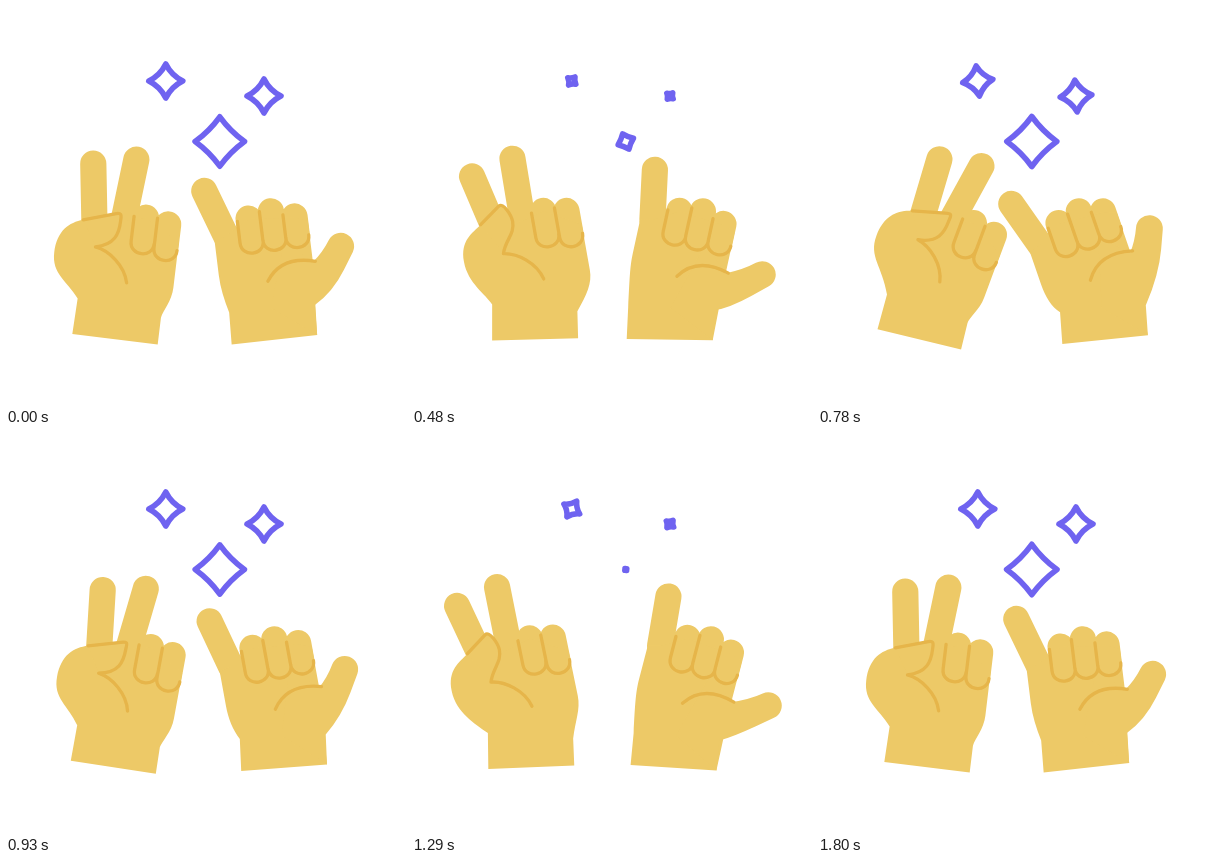
These frames come from a looping animation (400x400 px, 3.83 s). An HTML page:

```html
<!DOCTYPE html>
<html lang="en">
<head>
<meta charset="utf-8">
<title>Hand signs</title>
<style>
  html, body { margin: 0; width: 100%; height: 100%; overflow: hidden; background: #fff; }
  svg { display: block; width: 100%; height: 100%; }
  .skin { fill: #edc967; }
  .digit { fill: none; stroke: #edc967; stroke-width: 26.2; stroke-linecap: round; }
  .crease { fill: none; stroke: #e6b54a; stroke-width: 3.3; stroke-linecap: round; stroke-linejoin: round; }
  .star { fill: none; stroke: #6f63f0; stroke-width: 5.6; stroke-linejoin: round; }
</style>
</head>
<body>
<svg id="stage" viewBox="0 0 400 400"></svg>
<script>
const LOOP = 3830, STEP = 30, END = 1800;
const stage = document.getElementById('stage');

function add(cls) {
  const el = document.createElementNS('http://www.w3.org/2000/svg', 'path');
  el.setAttribute('class', cls);
  stage.appendChild(el);
  return el;
}

const clamp = v => Math.min(1, Math.max(0, v));
const rad = d => d * Math.PI / 180;
const mix = (a, b, k) => a + (b - a) * k;

// Smooth monotone curve through a few keys, at rest at both ends.
function track(times, vals) {
  const n = times.length;
  const slope = i => (vals[i + 1] - vals[i]) / (times[i + 1] - times[i]);
  const tan = vals.map((_, i) => {
    if (i === 0 || i === n - 1) return 0;
    const a = slope(i - 1), b = slope(i);
    return a * b > 0 ? 2 * a * b / (a + b) : 0;
  });
  return t => {
    let i = 0;
    while (i < n - 2 && t > times[i + 1]) i++;
    const h = times[i + 1] - times[i];
    const u = clamp((t - times[i]) / h), v = 1 - u;
    return v * v * ((1 + 2 * u) * vals[i] + u * h * tan[i]) +
           u * u * ((3 - 2 * u) * vals[i + 1] - v * h * tan[i + 1]);
  };
}

// The hands mirror one swing; each also slides a little sideways.
const beats = [0, 510, 780, 1050, 1290, 1500, END];
const swing = track(beats, [7, -12.5, 19, 0, -14.5, 0, 7]);
const leftSlide = track(beats, [-1, 9, 0, 0, -3, -1, -1]);
const rightSlide = track(beats, [-4.5, -3.5, 7, .5, 1.5, -3, -4.5]);

const pt = p => p[0].toFixed(2) + ' ' + p[1].toFixed(2) + ' ';
const move = p => 'M' + pt(p);
const path = (...points) => points.map(p => 'L' + pt(p)).join('');
const line = (a, b) => move(a) + path(b);
const curve = (a, b, c) => 'C' + pt(a) + pt(b) + pt(c);
const quad = (a, b) => 'Q' + pt(a) + pt(b);
const sum = (a, b) => [a[0] + b[0], a[1] + b[1]];
const up = (deg, len) => [Math.sin(rad(deg)) * len, -Math.cos(rad(deg)) * len];
const finger = (base, deg, len) => line(base, sum(base, up(deg, len)));

// Maps local coordinates to stage coordinates.
function frame(x, y, deg) {
  const c = Math.cos(rad(deg)), s = Math.sin(rad(deg));
  return (px, py) => [x + px * c - py * s, y + px * s + py * c];
}

// Crease down one side of a curled finger and around its tip.
function curl(at, x, top, low) {
  const w = 23.2, k = 15;
  return line(at(x, top), at(x, low)) +
    curve(at(x, low + k), at(x + w, low + k), at(x + w, low));
}

function leftHand(t) {
  const s = swing(t), slide = leftSlide(t);
  const turn = s * (.92 + .008 * s);
  const at = frame(133.5 + 1.1 * turn + slide, 209 + .4 * turn, turn);
  const arm = frame(113.5 - .6 * turn + .4 * slide, 333.3, 3.5 + .5 * turn);
  const index = at(-50.5, 12), middle = at(-22, 6);

  // The thumb unfolds as the hand leans left.
  const k = clamp((8 - turn) / 17);
  const sx = mix(-62, -64, k), sy = mix(10, 2.5, k);
  const ax = mix(-30.5, -43, k), ay = mix(.7, -12.5, k);
  const bx = mix(-24.3, -32, k), by = mix(6.5, 5, k);
  const vx = -46.7, vy = 35;
  const ex = (ax - sx) * .4, ey = (ay - sy) * .4;
  const root = at(sx, sy), fold = at(vx, vy), bulge = mix(46, 36, k);
  const edge = move(root) + path(at(ax, ay)) +
    curve(at(ax + ex * .6, ay + ey * .6), at(bx, by - 6), at(bx, by)) +
    curve(at(bx, by + 13), at(vx + mix(20, 4, k), vy + mix(-4, -13, k)), fold);

  return {
    digits: finger(index, 1.3 * turn - 10, 60) + finger(middle, 1.25 * turn + 3.3, 62.8) +
      line(at(0, 0), at(0, 25)) + line(at(22.8, 4), at(22.8, 29)),
    palm: move(arm(-43, 0)) + path(arm(43, 0), arm(43, -27)) +
      curve(at(28, 90), at(35.5, 80), at(35.5, 66)) +
      path(at(35.5, 20), at(0, 0), middle, index, root) +
      curve(at(sx - ex * 1.1, sy - ey * 1.1), at(-87, bulge - 22), at(-87, bulge)) +
      curve(at(-87, bulge + 22), at(-71, 72), arm(-42, -36)) + 'Z',
    thumb: edge + 'Z',
    crease: edge + curve(at(vx + 14, vy + 2), at(-15.5, 50), at(-11.5, 67)) +
      curl(at, -12, 0, 25) + curl(at, 11.5, -1, 29)
  };
}

function rightHand(t) {
  const turn = -swing(t), slide = rightSlide(t), r = 13.4;
  const at = frame(278.5 + 1.3 * turn + slide, 205.3, turn);
  const arm = frame(268.7 - .6 * turn + slide, 333.7, .35 * turn + .4 * slide - 2);
  const pinky = at(-47.5, 19), lean = 39 + 1.8 * turn;
  const tip = at(67.5 + .33 * turn, 45.2 + .32 * turn);
  const upper = sum(tip, up(lean - 90, r)), lower = sum(tip, up(lean + 90, r));

  return {
    digits: finger(pinky, 1.45 * turn + .7 * slide - 12.5, 50) +
      line(at(-23, 4.5), at(-23, 27)) + line(at(0, 0), at(0, 27)) +
      line(at(22.8, 8), at(22.8, 27)),
    palm: move(arm(43, 0)) + path(arm(-43, 0), arm(-42, -32)) +
      curve(at(-57, 82), at(-59.5, 70), at(-59.5, 57)) +
      path(at(-59.5, 22), pinky, at(-23, 5), at(23, 9), at(35.5, 14), at(35.5, 55)),
    thumb: move(arm(0, -32)) + path(at(10, 30), at(35, 56)) +
      quad(sum(upper, up(lean, -14)), upper) +
      `A${r} ${r} 0 0 1 ` + pt(lower) + path(sum(lower, up(lean, -20))) +
      quad(sum(lower, up(lean, -45)), arm(44, -30)) + path(arm(43, 0)) + 'Z',
    crease: [-34.5, -11.5, 11.5].map((x, i) => curl(at, x, [6, -1, 5][i], 28)).join('') +
      move(at(-11.5, 69)) + curve(at(-2, 55), at(14, 48), at(38, 55))
  };
}

function makeHand(pose) {
  const digits = add('digit'), palm = add('skin'), thumb = add('skin'), crease = add('crease');
  const layers = { digits, palm, thumb, crease };
  return t => Object.entries(pose(t)).forEach(([name, d]) => layers[name].setAttribute('d', d));
}

// A star shrinks to a dot at each dip, making a quarter turn on the way.
function makeStar(x, y, r, bow, width, dips) {
  const el = add('star');
  return t => {
    let size = r, turn = 0;
    for (const dip of dips) {
      size *= 1 - .95 * Math.exp(-(((t - dip) / width) ** 2));
      turn += 90 * clamp((t - dip + 340) / 600);
    }
    const b = size * bow;
    let d = move(frame(x, y, turn)(0, -size));
    for (let i = 0; i < 4; i++) {
      const at = frame(x, y, turn + 90 * i);
      d += quad(at(b, -b), at(size, 0));
    }
    el.setAttribute('d', d + 'Z');
  };
}

const parts = [
  makeHand(leftHand),
  makeHand(rightHand),
  makeStar(213.8, 135.5, 25.2, .42, 187, [370, 1290]),
  makeStar(159.8, 75, 17, .33, 148, [562, 1417]),
  makeStar(258, 90, 17, .33, 142, [548, 1365])
];

const start = performance.now();
function tick() {
  const now = (performance.now() - start) % LOOP;
  const t = Math.min(END, Math.floor(now / STEP) * STEP);
  parts.forEach(part => part(t));
  requestAnimationFrame(tick);
}
tick();
</script>
</body>
</html>
```
